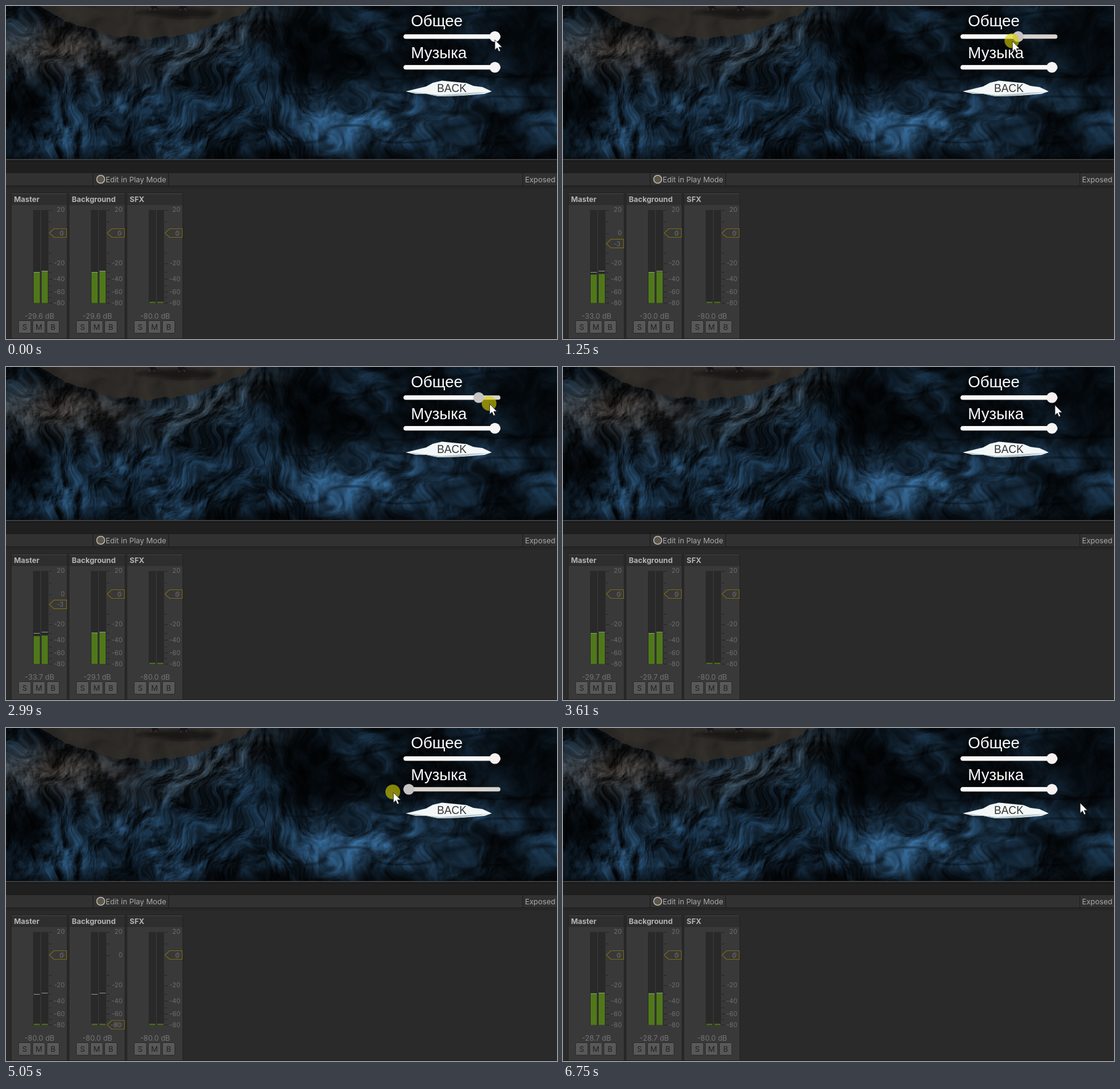
An HTML page with a canvas for the animation above (6820 ms loop, 896x542 px).

```html
<!DOCTYPE html>
<html lang="ru">
<head>
<meta charset="utf-8">
<title>Audio mixer</title>
<style>
html, body { margin: 0; width: 100%; height: 100%; overflow: hidden; background: #2a2a2a; }
canvas, svg { position: absolute; left: 0; top: 0; display: block; }
text { font-family: Inter, Roboto, sans-serif; font-size: 12.1px; }
.menu { font-family: "Liberation Sans", Arial, sans-serif; }
.label { font-size: 25.7px; fill: #fff; }
.title { font-weight: 650; fill: #b4b4b4; }
.scale { font-size: 10.4px; fill: #6e6e6e; text-anchor: end; }
.db { font-size: 11.8px; fill: #757575; text-anchor: middle; }
.key { fill: #202020; text-anchor: middle; }
</style>
</head>
<body>
<canvas id="rock" width="896" height="249"></canvas>
<svg id="ui" width="896" height="542" viewBox="0 0 896 542">
  <defs>
    <filter id="soft"><feGaussianBlur stdDeviation="2"/></filter>
    <clipPath id="view"><rect width="896" height="249"/></clipPath>
  </defs>
  <g clip-path="url(#view)">
    <path d="M206 12L238 5 300 3 344 9 332 18 280 20 228 13Z" fill="#0b0d10" opacity=".6" filter="url(#soft)"/>
    <g id="feet" fill="#17131a">
      <path d="M233-2l4 6-5 3 7-2 4 2-1-4 6 2-5-7z"/>
      <path d="M279-2l4 5-3 4 6-3 6 3-2-5 6 2-6-6z"/>
      <path d="M236 4l-3 3M241 4l2 3M284 5l-2 3M290 4l3 3" stroke="#58313a" stroke-width="1.2"/>
    </g>
  </g>
  <path d="M650 139L683 131 694 125 709 121.500 749 125.500 760 130 775 132 790 139 778 143 741 146 703 147 684 143 667 143Z" fill="#f3f7f8"/>
  <path d="M655 139L706 145 757 141 785 140 741 146 703 147 684 143 667 143Z" fill="#b9c8cc"/>
  <text class="menu label" x="658.500" y="33">Общее</text>
  <text class="menu label" x="658.500" y="84.500">Музыка</text>
  <text class="menu" x="701" y="139.500" style="font-size:17.6px" fill="#333">BACK</text>
  <g id="sliders"></g>

  <rect y="249" width="896" height="293" fill="#2a2a2a"/>
  <rect y="249" width="896" height="2" fill="#3b3b3b"/>
  <rect y="251" width="896" height="20" fill="#1f1f1f"/>
  <rect y="251" width="896" height="2" fill="#181818"/>
  <rect y="272" width="896" height="20" fill="#313131"/>
  <path d="M0 271.500H896M0 292.500H896M141.500 272V292M264.500 272V292M840.500 272V292" stroke="#1c1c1c"/>
  <rect y="293" width="896" height="4" fill="#262626"/>
  <circle cx="154" cy="282" r="6.500" fill="#5e5646" stroke="#b6b6b6" stroke-width="1.500"/>
  <text x="162" y="287" fill="#a9a9a9">Edit in Play Mode</text>
  <text x="844" y="287" fill="#a9a9a9">Exposed Parameters</text>
  <g id="strips"></g>
  <rect y="541" width="896" height="1" fill="#1e1e1e"/>

  <g id="pointer">
    <circle id="press" cx="-1" cy="-1" r="12" fill="#d8d000" fill-opacity=".62"/>
    <path d="M0 0V16.500L3.800 13 6.400 19 9 17.900 6.500 12H11.700Z" fill="#fff" stroke="#222" stroke-width=".8"/>
  </g>
</svg>
<script>
const $ = id => document.getElementById(id);
const clamp = (v, lo, hi) => Math.min(hi, Math.max(lo, v));
const mix = (a, b, t) => a + (b - a) * t;
const smooth = t => t * t * (3 - 2 * t);

function add(parent, tag, attrs, text) {
  const node = document.createElementNS('http://www.w3.org/2000/svg', tag);
  set(node, attrs);
  if (text !== undefined) node.textContent = text;
  return parent.appendChild(node);
}
function set(node, attrs) {
  for (const name in attrs) node.setAttribute(name, attrs[name]);
}

// ---- Cliff backdrop ----
function hash(x, y) {
  let h = Math.imul(x, 374761393) ^ Math.imul(y, 668265263);
  h = Math.imul(h ^ (h >>> 13), 1274126177);
  return ((h ^ (h >>> 16)) >>> 0) / 4294967296;
}
function noise(x, y) {
  const i = Math.floor(x), j = Math.floor(y), u = smooth(x - i), v = smooth(y - j);
  return mix(mix(hash(i, j), hash(i + 1, j), u), mix(hash(i, j + 1), hash(i + 1, j + 1), u), v);
}
function fbm(x, y) {
  let sum = 0;
  for (let amp = .5; amp > .05; amp /= 2) {
    sum += amp * noise(x, y);
    x = x * 2.1 + 7;
    y = y * 2.1 + 3;
  }
  return sum;
}
const spot = (x, y, cx, cy, rx, ry) => Math.exp(-(((x - cx) / rx) ** 2) - ((y - cy) / ry) ** 2);

const SHADE = [7, 15, 22], BLUE = [36, 71, 102], BROWN = [74, 62, 52], GREY = [72, 79, 82], SAND = [50, 47, 43];

function rockPixel(x, y) {
  const cliff = clamp((x - 420) / 90, 0, 1);
  const lean = x < 485 ? .35 * Math.sin((x - 140) / 110) : 0;
  const warp = noise(x / 38, y / 32) * 1.3;
  const u = (x + lean * (y - 125)) / mix(20, 34, cliff) + warp;
  const v = y / mix(28, 36, cliff) + warp;
  const n = fbm(u, v), relief = n - fbm(u - .09, v - .06);

  const bottom = 52 * (1 - ((x - 225) / 178) ** 2) + 14 * (n - .5);
  if (y < bottom) return SAND.map(c => c * (.65 + .5 * n));

  const glow = spot(x, y, 530, 170, 75, 55) + .7 * spot(x, y, 640, 200, 140, 40) + .6 * spot(x, y, 90, 215, 60, 35);
  const dark = spot(x, y, 495, 45, 50, 75) + spot(x, y, 840, 50, 70, 85) + spot(x, y, 25, 165, 50, 45) + .6 * spot(x, y, 660, 45, 70, 70);
  const brown = spot(x, y, 90, 70, 120, 42);
  const ridge = spot(x, y + .43 * (x - 200), 325, 118, 110, 30);

  const blue = clamp(.28 + 1.2 * (fbm(x / 90, y / 50) - .47) + .6 * glow - .4 * dark, 0, 1);
  const crack = cliff * clamp(1 - 9 * Math.abs(noise(x / 80, y / 26 + 40) - .5), 0, 1);
  const lit = Math.max(.15, .45 + 1.1 * clamp((n - .3) * 2.6, 0, 1) + mix(4, 2, cliff) * relief)
    * (1 - .4 * crack) * (1 - .5 * clamp(dark, 0, 1)) * mix(1, .6, clamp((y - 225) / 24, 0, 1));
  return SHADE.map((c, i) => lit * mix(mix(mix(c, BLUE[i], blue), BROWN[i], .6 * brown), GREY[i], .45 * ridge));
}
function drawRock() {
  const { width: w, height: h } = $('rock'), ctx = $('rock').getContext('2d');
  const img = ctx.createImageData(w, h);
  for (let y = 0, i = 0; y < h; y++)
    for (let x = 0; x < w; x++, i += 4) img.data.set([...rockPixel(x, y), 255], i);
  ctx.putImageData(img, 0, 0);
}

// ---- Sliders ----
const LEFT = 655, RIGHT = 795;
function makeSlider(y) {
  const g = $('sliders');
  const bar = fill => add(g, 'rect', { x: 646.5, y: y - 3.5, width: 157.5, height: 7, rx: 3.5, fill });
  bar('#d8d3cd');
  const fill = bar('#fcfaf9'), knob = add(g, 'circle', { cy: y, r: 8.8 });
  return (x, color) => {
    set(fill, { width: x >= RIGHT ? 157.5 : x - 646.5, opacity: x <= LEFT ? 0 : 1 });
    set(knob, { cx: x, fill: color });
  };
}

// ---- Mixer strips ----
const dbY = db => db > 0 ? 369.5 - 1.9 * db : 369.5 + 113.5 * (-db / 80) ** .6;

function makeStrip(x, name) {
  const g = add($('strips'), 'g', { transform: `translate(${x} 0)` });
  const rect = (x, y, width, height, fill) => add(g, 'rect', { x, y, width, height, fill });
  const text = (cls, x, y, s) => add(g, 'text', { class: cls, x, y }, s);
  rect(-1, 304, 92, 238, '#212121');
  rect(0, 305, 90, 237, '#393939');
  rect(0, 305, 90, 1, '#464646');
  rect(0, 306, 90, 18, '#2e2e2e');
  text('title', 4, 319, name);
  rect(35, 332, 25, 152, '#292929');
  rect(47, 332, 1, 152, '#3b3b3b');
  for (let db = 20; db >= -80; db -= 10) {
    const major = db % 20 === 0, y = dbY(db);
    rect(61, Math.round(y), major ? 5 : 4, 1, '#232323');
    if (major) text('scale', 86.5, y + 3.5, db);
  }
  const bars = [36, 49].map(x => rect(x, 0, 10, 0, '#50781a'));
  const peaks = [36, 49].map(x => rect(x, 0, 10, 1, '#8b9c86'));
  const fader = add(g, 'g', {});
  add(fader, 'path', { d: 'M61.500 0L69-7H89.500V7H69Z', fill: '#393939', 'fill-opacity': .6, stroke: '#786819', 'stroke-width': 1.2 });
  const value = add(fader, 'text', { class: 'scale', x: 84.5, y: 4 });
  const readout = text('db', 45.5, 509);
  [...'SMB'].forEach((s, i) => {
    const x = 12 + 23 * i;
    add(g, 'rect', { x: x - .5, y: 512.5, width: 20, height: 20, rx: 2, fill: '#585858', stroke: '#2b2b2b' });
    rect(x + 1, 513, 17, 1, '#686868');
    text('key', x + 9.5, 527, s);
  });
  return (gain, level) => {
    const silent = level <= -80;
    level = Math.max(-80, level);
    set(fader, { transform: `translate(0 ${dbY(gain)})` });
    value.textContent = Math.round(gain) || 0;
    readout.textContent = level.toFixed(1) + ' dB';
    bars.forEach((bar, i) => {
      const y = Math.min(481.5, dbY(level) + 1 - i);
      set(bar, { y, height: 483.5 - y });
      set(peaks[i], { y: Math.min(y, 433 - 2 * i), opacity: name === 'SFX' && silent ? 0 : 1 });
    });
  };
}

const LOOP = 6820, STEP = 69.2, LAST = 97;
const KNOB_LAG = .6, FADER_LAG = 1.2, METER_LAG = 1.6;
const DRAG = { master: [9, 48], music: [61, 90] };
const HOME = { x: 795, y: 55 };
const GLIDES = [
  { from: 11.5, to: 26.5, x: 635, y: 61 },
  { from: 36.5, to: 46.5, x: 846, y: 60 },
  { from: 47, to: 51.5, x: 800, y: 62 },
  { from: 52, to: 58, x: 790, y: 100 },
  { from: 62, to: 71.5, x: 630, y: 105 },
  { from: 82, to: 88.67, x: 841, y: 122 },
];
function cursor(k) {
  return GLIDES.reduce((at, leg) => {
    const t = smooth(clamp((k - leg.from) / (leg.to - leg.from), 0, 1));
    return { x: mix(at.x, leg.x, t), y: mix(at.y, leg.y, t) };
  }, HOME);
}
const held = (k, [from, to]) => k >= from && k < to;

function knobX(k, [from, to]) {
  return k < from + 2 || k > to ? RIGHT : clamp(cursor(k).x, LEFT, RIGHT);
}
function gain(k, drag) {
  const v = (knobX(k, drag) - LEFT) / (RIGHT - LEFT);
  return Math.max(-80, 20 * Math.log10(v));
}
const musicLevel = k => -29.4 + .7 * Math.sin(.6 * k - .25);

function knobColor(k, drag) {
  if (held(k, drag)) return '#c6c3c3';
  return k < drag[0] ? '#f5f5f5' : '#f6f0f0';
}

drawRock();
const sliders = { master: makeSlider(49.7), music: makeSlider(99.7) };
const strips = { master: makeStrip(9, 'Master'), music: makeStrip(103, 'Background') };
makeStrip(197, 'SFX')(0, -80);

function draw(now) {
  const k = Math.min(LAST, Math.floor((now % LOOP + 4) / STEP));
  let level = musicLevel(k);
  for (const name of ['music', 'master']) {
    const drag = DRAG[name];
    sliders[name](knobX(k - KNOB_LAG, drag), knobColor(k, drag));
    level += gain(k - METER_LAG, drag);
    strips[name](gain(k - FADER_LAG, drag), level);
  }
  const { x, y } = cursor(k);
  set($('pointer'), { transform: `translate(${x} ${y})` });
  set($('press'), { opacity: Object.values(DRAG).some(drag => held(k, drag)) ? 1 : 0 });
  set($('feet'), { transform: `translate(${1.5 * Math.sin(k / 9)} ${Math.sin(k / 6)})` });
}
const start = performance.now();
(function tick() {
  draw(performance.now() - start);
  requestAnimationFrame(tick);
})();
</script>
</body>
</html>
```
